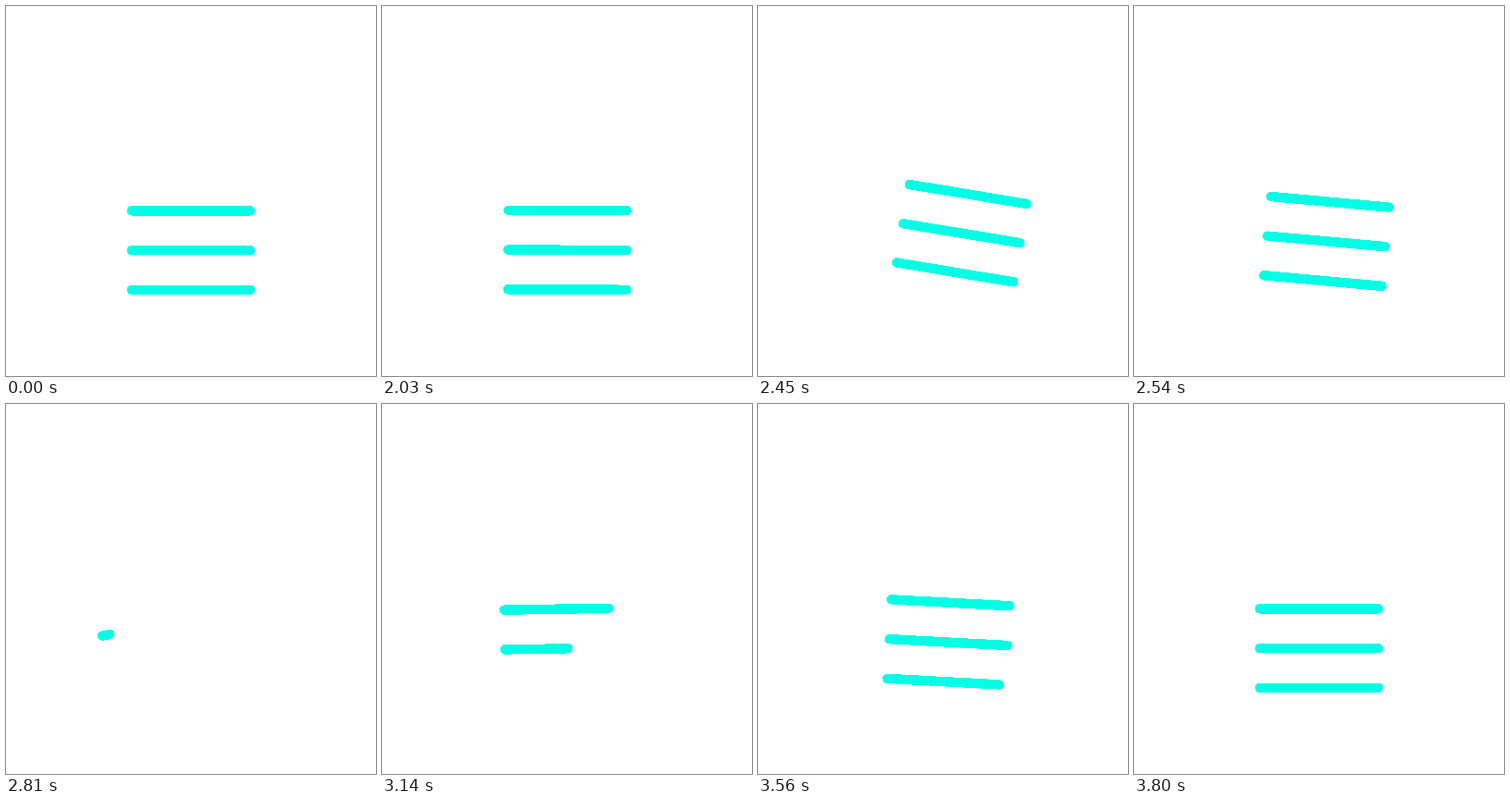
Animation, 400 px wide and 400 px high, one loop 3890 ms. Source, as an HTML page:

```html
<!DOCTYPE html>
<html lang="en">
<head>
<meta charset="utf-8">
<title>Swinging menu lines</title>
<style>
  html, body { margin: 0; height: 100%; overflow: hidden; background: #fff; }
  svg { display: block; width: 100%; height: 100%; }
  line {
    stroke: #00ffe5; stroke-width: 10.4; stroke-linecap: round;
    shape-rendering: crispEdges;
  }
</style>
</head>
<body>
<svg viewBox="0 0 400 400"><g id="menu"></g></svg>
<script>
const LOOP = 3890, STEP = 30, PHASE = 20;
const ROWS = 3, LENGTH = 128, GAP = 42.8;
const HIDE = 2660, DRAW = 2793, STAGGER = 180, DRAW_TIME = 525;

// Turning points of the swing: x and y of the upper left line end, degrees.
// Lag above 1 delays the way to that point.
const rest = [136, 221.3, 0];
const swings = [
  { at: 2000, pose: rest },
  { at: 2320, pose: [171.2, 188, 10.9] },
  { at: 2810, pose: [104, 250.5, -10.6], lag: [1.1, 1.21, 1.26] },
  { at: 3390, pose: [148.6, 206.2, 4.7] },
  { at: 3800, pose: rest }
];

const menu = document.getElementById('menu');
const lines = Array.from({ length: ROWS }, (_, row) => {
  const line = document.createElementNS(menu.namespaceURI, 'line');
  line.setAttribute('y1', row * GAP);
  line.setAttribute('y2', row * GAP);
  return menu.appendChild(line);
});

const clamp = v => Math.min(1, Math.max(0, v));
const easeInOut = u => u < 0.5 ? 2 * u * u : 1 - 2 * (1 - u) ** 2;
const easeOut = u => 1 - (1 - u) ** 2;

function poseAt(t) {
  const next = Math.max(1, swings.findIndex(s => t < s.at));
  if (t < swings[0].at || t >= swings.at(-1).at) return rest;
  const from = swings[next - 1], to = swings[next];
  const u = (t - from.at) / (to.at - from.at);
  return from.pose.map((a, i) =>
    a + (to.pose[i] - a) * easeInOut(u ** (to.lag?.[i] ?? 1)));
}

function shown(t, row) {
  return t < HIDE ? 1 : easeOut(clamp((t - DRAW - row * STAGGER) / DRAW_TIME));
}

function draw(now) {
  const t = Math.floor((now % LOOP - PHASE) / STEP) * STEP + PHASE;
  const [x, y, angle] = poseAt(t);
  menu.setAttribute('transform', `translate(${x} ${y}) rotate(${angle})`);
  lines.forEach((line, row) => {
    const part = shown(t, row);
    line.setAttribute('x2', LENGTH * part);
    line.setAttribute('visibility', part > 0 ? 'visible' : 'hidden');
  });
}

const start = performance.now();
function tick() {
  draw(performance.now() - start);
  requestAnimationFrame(tick);
}
tick();
</script>
</body>
</html>
```
